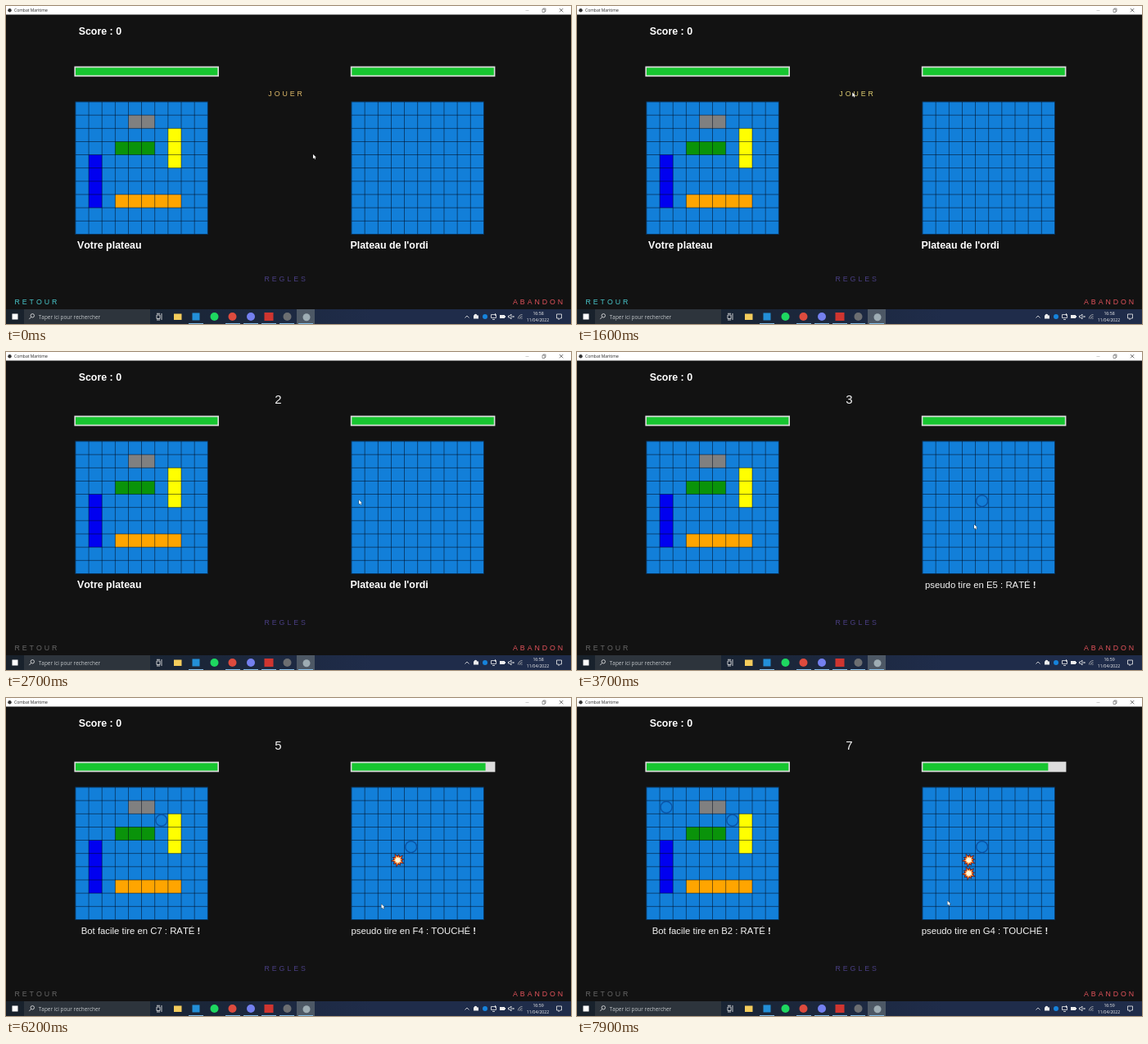
An HTML page with a canvas for the animation above (8 s loop, 690 px wide and 388 px high).

```html
<!DOCTYPE html>
<html lang="fr">
<head>
<meta charset="utf-8">
<title>Combat Maritime</title>
<style>
  html, body { margin: 0; width: 100%; height: 100%; overflow: hidden; background: #121212; }
  canvas { display: block; }
</style>
</head>
<body>
<canvas id="stage" width="690" height="388"></canvas>
<script>
const ctx = document.getElementById('stage').getContext('2d');
ctx.fontKerning = 'none';
const LOOP = 8, STEP = 0.1;
const CELL = 16.14, SIZE = 10, SHIP_CELLS = 17;
const LEFT = 84.9, RIGHT = 422;
const ARIAL = '"Liberation Sans", Arial, sans-serif';
const UI = '"Open Sans", sans-serif';

// Seconds at which the state changes
const START = 1.7, NEW_MINUTE = 3;
const playerShots = [
  { at: 3.4, row: 4, col: 4, x: 425, text: 'pseudo tire en E5 : RATÉ' },
  { at: 5.6, row: 5, col: 3, x: 421.5, text: 'pseudo tire en F4 : TOUCHÉ', hit: true },
  { at: 7.3, row: 6, col: 3, x: 420.7, text: 'pseudo tire en G4 : TOUCHÉ', hit: true }
];
const botShots = [
  { at: 4.4, row: 2, col: 6, x: 91.7, text: 'Bot facile tire en C7 : RATÉ' },
  { at: 6.4, row: 1, col: 1, x: 91.7, text: 'Bot facile tire en B2 : RATÉ' }
];
const ships = [
  { color: '#808080', col: 4, row: 1, w: 2, h: 1 },
  { color: '#ffff00', col: 7, row: 2, w: 1, h: 3 },
  { color: '#0a930a', col: 3, row: 3, w: 3, h: 1 },
  { color: '#0000f0', col: 1, row: 4, w: 1, h: 4 },
  { color: '#ffa500', col: 3, row: 7, w: 5, h: 1 }
];
// Pointer stops: time, x, y
const pointerPath = [
  [0, 375, 181], [0.9, 336.3, 105.5], [1.6, 336.3, 105.5], [2.7, 431, 180.5],
  [3.1, 491, 181], [3.5, 491, 181], [3.7, 485, 210.5], [4.4, 455.5, 257.5],
  [4.9, 455.5, 257.5], [5.4, 476, 196], [5.6, 476, 196], [6.2, 458.5, 251.5],
  [6.4, 458.5, 251.5], [7, 476, 211], [7.5, 476, 211], [7.9, 452.5, 247.5]
];

function box(x, y, w, h, color) {
  ctx.fillStyle = color;
  ctx.fillRect(x, y, w, h);
}

function disc(x, y, r, color) {
  ctx.fillStyle = color;
  ctx.beginPath();
  ctx.arc(x, y, r, 0, 7);
  ctx.fill();
}

function text(str, x, y, size, color, { bold = false, family = ARIAL, align = 'left' } = {}) {
  ctx.font = `${bold ? 'bold ' : ''}${size}px ${family}`;
  ctx.textAlign = align;
  ctx.fillStyle = color;
  ctx.fillText(str, x, y);
}

function outline(path, color = '#eee', width = 0.8) {
  ctx.strokeStyle = color;
  ctx.lineWidth = width;
  ctx.stroke(new Path2D(path));
}

function spaced(word, x, y, color) {
  ctx.letterSpacing = '2.95px';
  text(word, x, y, 8.8, color);
  ctx.letterSpacing = '0px';
}

function pointerAt(t) {
  const next = pointerPath.findIndex(p => p[0] > t);
  if (next < 0) return pointerPath.at(-1).slice(1);
  const [t0, x0, y0] = pointerPath[next - 1], [t1, x1, y1] = pointerPath[next];
  const u = (t - t0) / (t1 - t0), k = u * u * (3 - 2 * u);
  return [x0 + (x1 - x0) * k, y0 + (y1 - y0) * k];
}

function drawHealth(x, y, hits) {
  box(x, y, 176.6, 12.6, '#dcdcdc');
  box(x + 1.6, y + 1.7, 173.4 * (1 - hits / SHIP_CELLS), 9.2, '#17c630');
}

function drawBoard(x, y, fleet) {
  const span = CELL * SIZE;
  box(x - 0.3, y - 0.3, span + 0.6, span + 0.6, '#127fd9');
  for (const s of fleet)
    box(x + s.col * CELL, y + s.row * CELL, s.w * CELL, s.h * CELL, s.color);
  for (let i = 0; i <= SIZE; i++) {
    const d = i * CELL - 0.4;
    box(x + d, y, 0.8, span, 'rgba(0,10,25,.65)');
    box(x, y + d, span, 0.8, 'rgba(0,10,25,.65)');
  }
}

function star(x, y, r, inner, color) {
  const points = 10;
  ctx.fillStyle = color;
  ctx.beginPath();
  for (let i = 0; i < points * 2; i++) {
    const a = i * Math.PI / points + 0.5;
    const d = i % 2 ? inner : r * (i % 4 ? 0.83 : 1);
    ctx.lineTo(x + d * Math.cos(a), y + d * Math.sin(a));
  }
  ctx.fill();
}

function drawShots(shots, x, y) {
  for (const s of shots) {
    const cx = x + (s.col + 0.5) * CELL, cy = y + (s.row + 0.5) * CELL;
    if (s.hit) {
      star(cx, cy, 9.2, 5.2, '#34202c');
      star(cx, cy, 7.9, 4.3, '#e0441e');
      star(cx, cy, 6, 3.4, '#ffae48');
      star(cx, cy, 4.4, 2.6, '#fff6dc');
    } else {
      ctx.strokeStyle = '#0a55a8';
      ctx.lineWidth = 1.5;
      ctx.beginPath();
      ctx.arc(cx, cy, 7, 0, 7);
      ctx.stroke();
    }
  }
}

function drawMessage(shot) {
  text(shot.text + ' ', shot.x, 288, 11.35, '#f4f4f4');
  const end = shot.x + ctx.measureText(shot.text + ' ').width;
  text('!', end, 288, 11.35, '#f4f4f4', { bold: true });
}

function drawTitleBar() {
  box(0, 0, 690, 10.5, '#fff');
  disc(4.5, 5.3, 2.2, '#333');
  text('Combat Maritime', 10, 7.2, 5, '#222', { family: UI });
  outline('M634.5 5.5h4', '#bbb', 0.7);
  outline('M655 4h3v3.5h-3zM656 4v-1h3v3.5h-1', '#555', 0.6);
  outline('M676 3l4.3 4.3M680.3 3l-4.3 4.3', '#333', 0.7);
}

function drawTaskbar(t) {
  const shade = ctx.createLinearGradient(0, 0, 690, 0);
  shade.addColorStop(0, '#18212b');
  shade.addColorStop(0.3, '#1a2536');
  shade.addColorStop(0.65, '#1f2c4a');
  box(0, 370, 690, 18, shade);
  box(22, 370, 154, 18, '#2d343c');
  box(355, 370, 22, 18, '#4d5865');
  box(7.5, 375.5, 7, 7, '#fff');
  outline('M34.5 377.8a2.2 2.2 0 1 1-4.4 0a2.2 2.2 0 1 1 4.4 0M30.6 379.5l-2.3 2.6');
  text('Taper ici pour rechercher', 39.8, 381.6, 6.4, '#c4c8cb', { family: UI });
  outline('M184 377h4v4.5h-4zM184 375.3h4M184 383h4M190 375v8');

  box(205, 375.5, 9.5, 7.5, '#f3cc5c');
  box(227.5, 374.5, 9, 9, '#238fd8');
  disc(254.5, 379, 5, '#1ed760');
  disc(276.5, 379, 5, '#dd4b3e');
  disc(299, 379, 5, '#7480ef');
  box(315.5, 374, 11, 10, '#cf3530');
  disc(343.5, 379, 5, '#6c6e71');
  disc(367, 379.8, 4.5, '#9eadb4');
  for (const x of [232, 277, 299, 321, 343, 366]) box(x - 9, 387, 18, 1, '#83bde8');

  outline('M560.5 380.5l2.5-2.5l2.5 2.5');
  box(571, 377.5, 6, 4, '#eee');
  disc(573.5, 377.5, 1.8, '#eee');
  disc(585, 379, 3, '#1683dc');
  outline('M592.5 376.5h6v4h-6zM594 382.5h3M597.5 375v3');
  box(603, 377, 6, 4, '#eee');
  box(609, 378, 1, 2, '#eee');
  outline('M613.5 378h1.5l2-2v6l-2-2h-1.5zM618.5 378l2 2M620.5 378l-2 2');
  outline('M625.5 381.5a5 5 0 0 1 5-5M627.5 381.8a3 3 0 0 1 3-3M629.5 382a1 1 0 0 1 1-1', '#bbb');
  const clock = { family: UI, align: 'center' };
  text(t < NEW_MINUTE ? '16:58' : '16:59', 650, 377.3, 5.2, '#eee', clock);
  text('11/04/2022', 649.5, 385.4, 5.2, '#eee', clock);
  outline('M672.5 376h6v5h-2l-1.5 1.7v-1.7h-2.5z');
}

function drawPointer([x, y]) {
  ctx.save();
  ctx.translate(x, y);
  const arrow = new Path2D('M0 0v5.3l1.3-1.2l.9 1.9l.9-.4l-.9-1.9h1.6z');
  ctx.strokeStyle = '#222';
  ctx.lineWidth = 0.6;
  ctx.stroke(arrow);
  ctx.fillStyle = '#fff';
  ctx.fill(arrow);
  ctx.restore();
}

function draw(t) {
  const playing = t >= START;
  const boardY = playing ? 109 : 117, barY = playing ? 77.7 : 73.6;
  const fired = playerShots.filter(s => t >= s.at);
  const received = botShots.filter(s => t >= s.at);
  const pointer = pointerAt(t);

  box(0, 0, 690, 388, '#121212');
  text('Score : 0', 88.7, playing ? 35.3 : 34.8, 12.4, '#fff', { bold: true });
  drawHealth(83.4, barY, 0);
  drawHealth(420.8, barY, fired.filter(s => s.hit).length);
  drawBoard(LEFT, boardY, ships);
  drawBoard(RIGHT, boardY, []);
  drawShots(received, LEFT, boardY);
  drawShots(fired, RIGHT, boardY);

  if (fired.length) {
    drawMessage(fired.at(-1));
    if (received.length) drawMessage(received.at(-1));
  } else {
    const labelY = playing ? 287.5 : 295.5;
    text('Votre plateau', 87, labelY, 12.4, '#fff', { bold: true });
    text("Plateau de l'ordi", 420.5, labelY, 12.4, '#fff', { bold: true });
  }

  if (playing) {
    text(Math.floor(t - 0.65), 332.4, 63.3, 15, '#f4f4f4', { align: 'center' });
  } else {
    spaced('JOUER', 320.3, 110.2, pointer[1] < 112 ? '#dccb70' : '#dcb868');
  }
  spaced('REGLES', 315.5, playing ? 333.3 : 336.3, '#4a3f84');
  spaced('RETOUR', 10.5, 363.7, playing ? '#666' : '#48c6ca');
  spaced('ABANDON', 619, 363.7, '#e0525a');

  drawTitleBar();
  drawTaskbar(t);
  drawPointer(pointer);
}

function frame(now) {
  const t = now / 1000 % LOOP;
  draw(Math.floor(t / STEP + 1e-6) / 10);
  requestAnimationFrame(frame);
}
requestAnimationFrame(frame);
</script>
</body>
</html>
```
